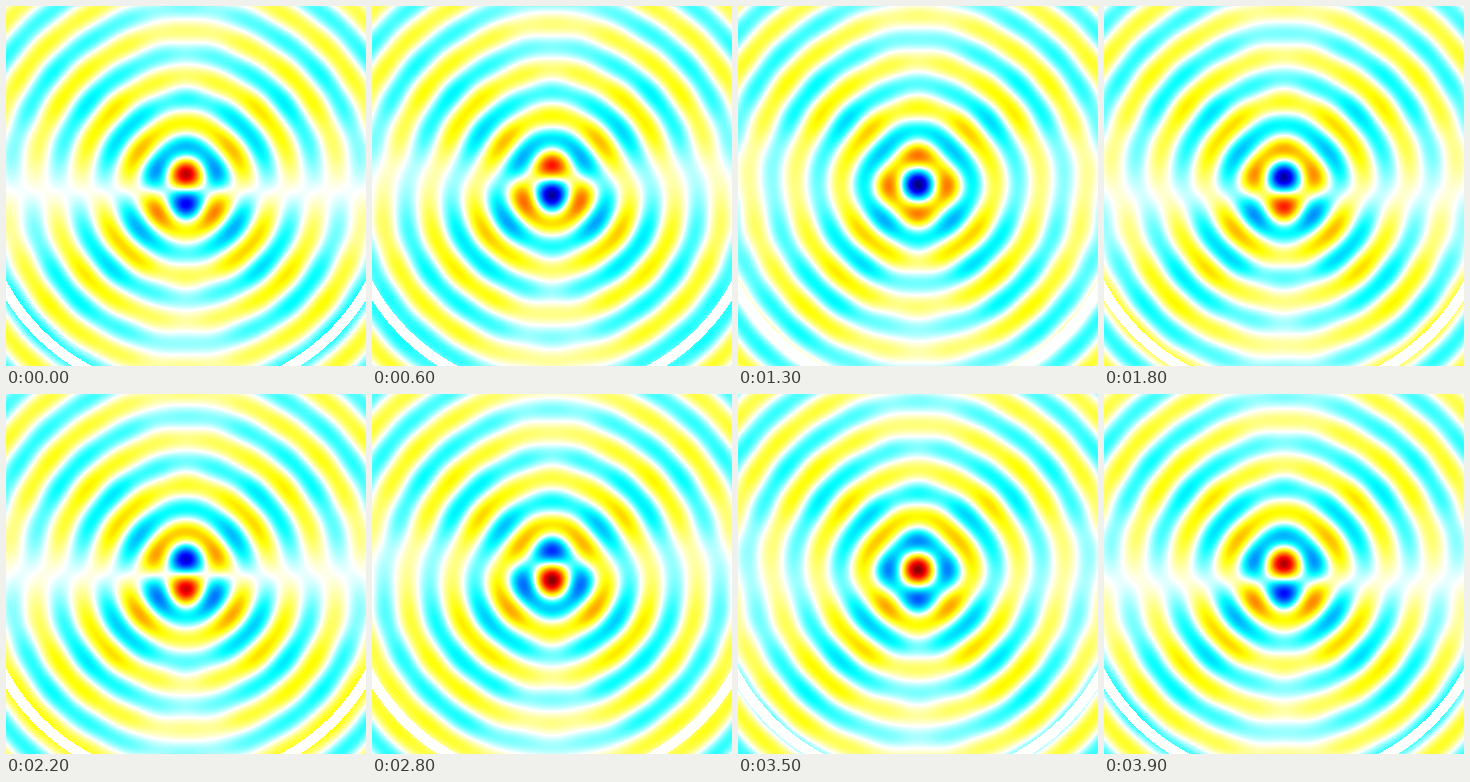
These frames come from a looping animation (360 px wide and 360 px high, 4 s). A matplotlib script:

```python
import numpy as np
import matplotlib.pyplot as plt
from matplotlib.animation import FuncAnimation
from matplotlib.colors import LinearSegmentedColormap

SIZE = 360
FRAMES = 40
INTERVAL = 100
WAVELENGTH = 46.0
RADIUS = 207.0
ARC_BAND = (203, 213)
ZERO_FRAME = 2      # the focus passes through zero here

wave_map = LinearSegmentedColormap.from_list("wave", [
    (0.0, (0, 0, 0.5)), (0.125, (0, 0, 1)), (0.375, (0, 1, 1)),
    (0.5, (1, 1, 1)),
    (0.625, (1, 1, 0)), (0.875, (1, 0, 0)), (1.0, (0.5, 0, 0)),
], N=512)


def focused_field(x, y):
    """Complex field of a lower half circle of emitters focused on the centre."""
    k = 2 * np.pi / WAVELENGTH
    count = 120
    angles = (np.arange(count) + 0.5) / count * np.pi - np.pi / 2
    weights = 1 - 0.42 * np.cos(4 * angles)
    total = np.zeros(x.shape, complex)
    for angle, weight in zip(angles, weights):
        dist = np.hypot(x - RADIUS * np.sin(angle), y - RADIUS * np.cos(angle))
        dist = np.maximum(dist, 2)
        total += weight * np.sqrt(RADIUS / dist) * np.exp(1j * k * (dist - RADIUS))
    return total / weights.sum()


axis = np.arange(SIZE) + 0.5 - SIZE / 2
x, y = np.meshgrid(axis, axis)
field = focused_field(x, y)

# The emitter arc itself stays blank.
r = np.hypot(x, y)
field[(y > 0) & (r > ARC_BAND[0]) & (r < ARC_BAND[1])] = 0


def snapshot(frame):
    phase = 2 * np.pi * (frame - ZERO_FRAME) / FRAMES + np.pi / 2
    return (field * np.exp(-1j * phase)).real


fig = plt.figure(figsize=(SIZE / 100, SIZE / 100), dpi=100, facecolor="white")
ax = fig.add_axes([0, 0, 1, 1])
ax.axis("off")
image = ax.imshow(snapshot(0), cmap=wave_map, vmin=-1, vmax=1,
                  interpolation="nearest", aspect="auto")


def update(frame):
    image.set_data(snapshot(frame))
    return [image]


anim = FuncAnimation(fig, update, frames=FRAMES, interval=INTERVAL,
                     repeat=True, repeat_delay=0, blit=False)
plt.show()
```
